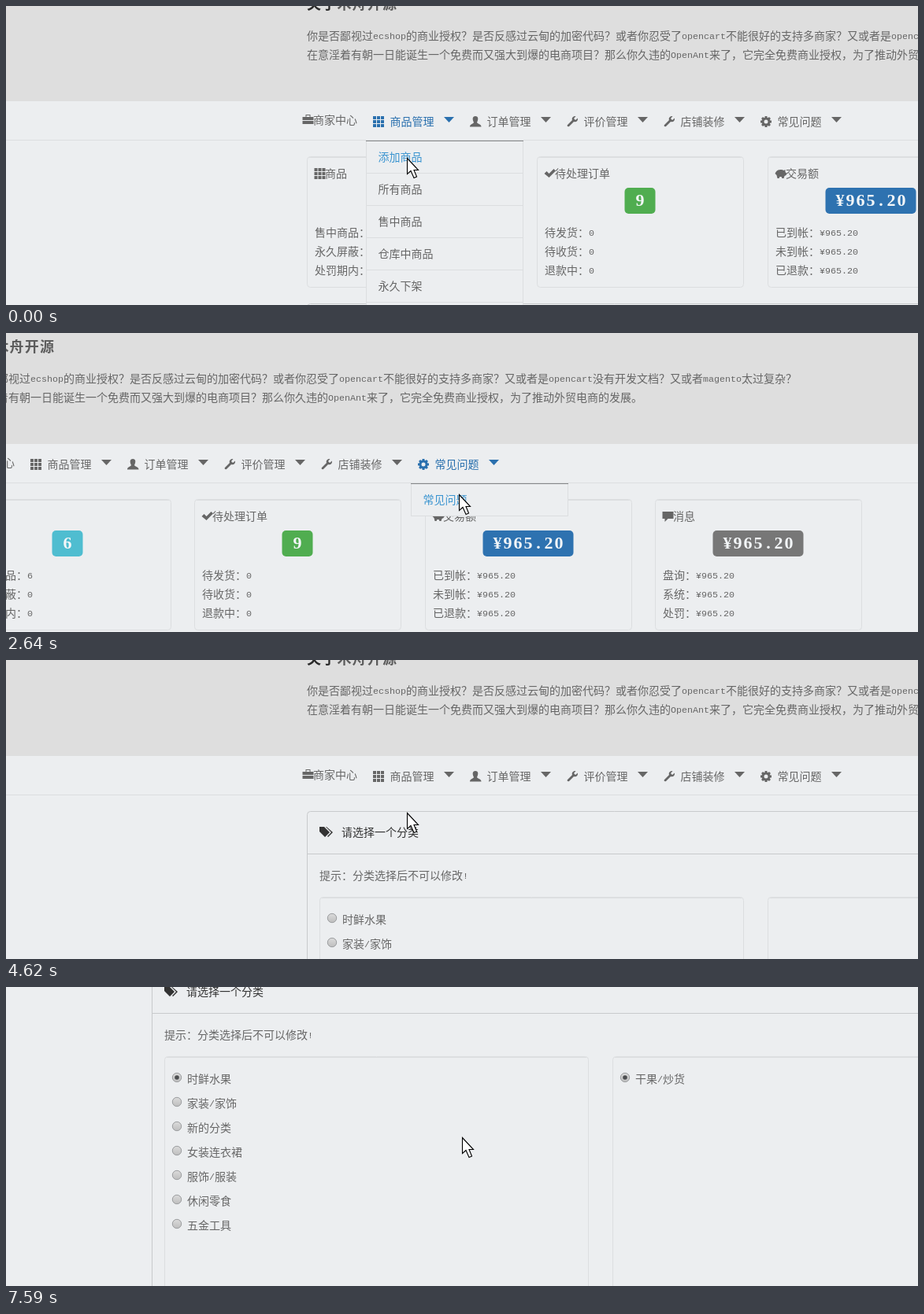
Recreate the animation shown at these times as an HTML page with a canvas. Size 1158x380 px, loop 8000 ms.

```html
<!DOCTYPE html>
<html lang="zh-CN">
<head>
<meta charset="utf-8">
<title>商家中心</title>
<style>
html, body { margin: 0; width: 100%; height: 100%; overflow: hidden; background: #eceef0; }
canvas { display: block; }
</style>
</head>
<body>
<canvas id="stage" width="1158" height="380"></canvas>
<script>
const ctx = document.getElementById('stage').getContext('2d');
const W = 1158, H = 380, LOOP = 8000, STEP = 330;
const BG = '#eceef0', INK = '#666', DARK = '#333', LINE = '#dcdee0', EDGE = '#c8cacc';
const ACTIVE = '#2a70ae', HOVER = '#3a94d0';
const SANS = '"Noto Sans CJK SC", "Noto Sans CJK", "Noto Sans SC", sans-serif';
const MONO = '"Liberation Mono", monospace';

// Camera x, y and pointer x, y on the stage, one row per step
const MOVES = [
  [0, 47, 509, 193], [40, 6, 600, 196], [75, 215, 592, 235], [80, 258, 604, 127],
  [165, 8, 585, 188], [191, 23, 598, 188], [300, 2, 590, 192], [420, 0, 585, 194],
  [435, 27, 575, 205], [0, 40, 420, 152], [0, 0, 515, 194], [0, 30, 512, 200],
  [0, 60, 510, 185], [0, 46, 509, 194], [0, 46, 509, 194], [0, 296, 475, 150],
  [0, 325, 455, 190], [0, 314, 453, 184], [0, 184, 418, 192], [0, 184, 418, 192],
  [150, 190, 560, 188], [390, 184, 590, 190], [330, 230, 585, 190], [197, 259, 579, 191]
];

// Open menu from a step on: menu index, hovered entry, caret up, opacity
const MENUS = [
  { from: 0, menu: 0, hover: 0 }, { from: 1, menu: 1, up: true }, { from: 2, menu: 1, hover: 5 },
  { from: 4, menu: 2, up: true }, { from: 6, menu: 3, up: true }, { from: 7, menu: 4, up: true },
  { from: 8, menu: 4, hover: 0 }, { from: 9 },
  { from: 10, menu: 0, up: true, alpha: 0.25, tint: '#4a6882' },
  { from: 11, menu: 0, hover: 0 }, { from: 14 }
];

const NAV = [
  { icon: 'grid', label: '商品管理', items: ['添加商品', '所有商品', '售中商品', '仓库中商品', '永久下架', '处罚期商品'] },
  { icon: 'user', label: '订单管理', items: ['所有订单', '待付款订单', '待发货订单', '待收货订单', '待评价订单', '交易成功订单', '退款中订单', '退款成功的订单'] },
  { icon: 'wrench', label: '评价管理', items: ['评价管理'] },
  { icon: 'wrench', label: '店铺装修', items: ['店铺装修'] },
  { icon: 'cog', label: '常见问题', items: ['常见问题'] }
];

const CARDS = [
  { x: 382, icon: 'grid', title: '商品', badge: '6', color: '#4fbdd0', rows: ['售中商品：6', '永久屏蔽：0', '处罚期内：0'] },
  { x: 674, icon: 'check', title: '待处理订单', badge: '9', color: '#50ad50', rows: ['待发货：0', '待收货：0', '退款中：0'] },
  { x: 967, icon: 'pig', title: '交易额', badge: '¥965.20', color: '#2e72b0', rows: ['已到帐：¥965.20', '未到帐：¥965.20', '已退款：¥965.20'] },
  { x: 1259, icon: 'comment', title: '消息', badge: '¥965.20', color: '#777', rows: ['盘询：¥965.20', '系统：¥965.20', '处罚：¥965.20'] }
];

const CATEGORIES = ['时鲜水果', '家装/家饰', '新的分类', '女装连衣裙', '服饰/服装', '休闲零食', '五金工具'];

const ICONS = {
  case: 'M0 4h14v4H0zM0 9h14v4H0zM4 4V1h6v3H9V2H5v2z',
  grid: [0, 5, 10].map(y => [0, 5, 10].map(x => `M${x} ${y}h4v4h-4z`).join('')).join(''),
  user: 'M7 0c4 0 4 4 2 8c1 2 5.500 2 5.500 5.500H0c0-3.500 4-3.500 5-5.500c-2-4-2-8 2-8z',
  wrench: 'M1 11l6-6c-1-3 1-5 4.500-5l-2.500 3 2 2 3-2.500c.5 3.500-2 5.500-5 4.500l-6 6c-2 1-3-1-2-2z',
  check: 'M0 7l3-3 3 3 6-6 2.500 2.500-8.500 8.500z',
  pig: 'M1 5c3-4 8-3 10-2l2-1v3l2 2-1 2-2 1-1 3H9l-1-2H6l-1 2H3L2 9 0 7z',
  comment: 'M0 1h14v9H7l-4 4v-4H0z',
  tags: 'M0 1h6l7 7-6 6-7-7zM8 1h1l8 7-6 6-1-1 5-5z'
};
for (const name in ICONS) ICONS[name] = new Path2D(ICONS[name]);

function rect(x, y, w, h, color) {
  ctx.fillStyle = color;
  ctx.fillRect(x, y, w, h);
}

function poly(color, ...points) {
  ctx.beginPath();
  for (let i = 0; i < points.length; i += 2) ctx.lineTo(points[i], points[i + 1]);
  ctx.closePath();
  ctx.fillStyle = color;
  ctx.fill();
}

function round(x, y, w, h, r, fill, stroke) {
  ctx.beginPath();
  ctx.roundRect(x, y, w, h, r);
  if (fill) { ctx.fillStyle = fill; ctx.fill(); }
  if (stroke) { ctx.strokeStyle = stroke; ctx.lineWidth = 1; ctx.stroke(); }
}

function oval(x, y, rx, ry, fill, angle = 0) {
  ctx.beginPath();
  ctx.ellipse(x, y, rx, ry, angle, 0, Math.PI * 2);
  ctx.fillStyle = fill;
  ctx.fill();
}

function ramp(x0, y0, x1, y1, ...colors) {
  const g = ctx.createLinearGradient(x0, y0, x1, y1);
  colors.forEach((c, i) => g.addColorStop(i / (colors.length - 1), c));
  return g;
}

// Full-width glyphs advance 14 px, half-width ones 7 px
function text(str, x, cy, color = INK) {
  ctx.fillStyle = color;
  for (const run of str.match(/[\x20-\x7e¥]+|[^\x20-\x7e¥]+/g)) {
    const half = /^[\x20-\x7e¥]/.test(run);
    ctx.font = half ? `11.67px ${MONO}` : `14px ${SANS}`;
    ctx.fillText(run, x, cy + (half ? 4 : 5));
    x += run.length * (half ? 7 : 14);
  }
}

function icon(name, x, y, color = INK) {
  ctx.save();
  ctx.translate(x, y);
  ctx.fillStyle = ctx.strokeStyle = color;
  if (name === 'cog') {
    ctx.translate(7, 7);
    ctx.lineWidth = 3;
    ctx.beginPath();
    ctx.arc(0, 0, 4, 0, Math.PI * 2);
    ctx.stroke();
    for (let i = 0; i < 8; i++) {
      ctx.rotate(Math.PI / 4);
      ctx.fillRect(-1.5, -7, 3, 3);
    }
  } else ctx.fill(ICONS[name]);
  ctx.restore();
}

function hero(sx) {
  rect(sx, -400, W, 568, '#dedede');
  ctx.font = `bold 18px ${SANS}`;
  ctx.letterSpacing = '1.2px';
  ctx.fillStyle = '#2a2a2a';
  ctx.fillText('关于', 382, 51);
  ctx.fillStyle = '#5c5c5c';
  ctx.fillText('木舟开源', 420.4, 51);
  ctx.letterSpacing = '0px';
  text('你是否鄙视过ecshop的商业授权？是否反感过云甸的加密代码？或者你忍受了opencart不能很好的支持多商家？又或者是opencart没有开发文档？又或者magento太过复杂？', 382, 85);
  text('在意淫着有朝一日能诞生一个免费而又强大到爆的电商项目？那么你久违的OpenAnt来了，它完全免费商业授权，为了推动外贸电商的发展。', 382, 109);
}

function nav(sx, open, homeColor) {
  rect(sx, 217, W, 1, LINE);
  icon('case', 376.5, 184, homeColor);
  text('商家中心', 390, 192, homeColor);
  NAV.forEach((item, i) => {
    const x = 466 + 123 * i, on = open.menu === i;
    const color = on ? open.tint || ACTIVE : INK;
    icon(item.icon, x, 187, color);
    text(item.label, x + 21.5, 194, color);
    if (on && open.up) poly(color, x + 90, 196, x + 103, 196, x + 96.5, 189);
    else poly(color, x + 90, 188, x + 103, 188, x + 96.5, 195);
  });
}

function dropdown({ menu, hover, alpha = 1 }) {
  if (menu === undefined) return;
  const x = 458 + 123 * menu, items = NAV[menu].items, h = items.length * 41;
  ctx.globalAlpha = alpha;
  rect(x - 1, 218, 200, h + 1, LINE);
  rect(x, 218, 198, h, BG);
  items.forEach((label, i) => {
    rect(x, 259 + 41 * i, 198, 1, LINE);
    text(label, x + 14.5, 239 + 41 * i, i === hover ? HOVER : INK);
  });
  rect(x - 1, 218, 200, 1, '#858789');
  ctx.globalAlpha = 1;
}

function card(c) {
  round(c.x + .5, 238.5, 262, 166, 4, BG, LINE);
  rect(c.x + 3, 239, 257, 1, LINE);
  icon(c.icon, c.x + 9.5, 253);
  text(c.title, c.x + 23, 260);
  const w = c.badge.length * 13 + (c.badge.length > 1 ? 24 : 26), left = c.x + 131 - w / 2;
  round(left, 278, w, 33, 5, c.color);
  ctx.font = 'bold 22px "Liberation Serif", serif';
  ctx.textAlign = 'center';
  ctx.fillStyle = '#f3f6f8';
  const start = left + (w - c.badge.length * 13) / 2 + 6.5;
  [...c.badge].forEach((ch, i) => ctx.fillText(ch, start + i * 13, 301));
  ctx.textAlign = 'left';
  c.rows.forEach((row, i) => text(row, c.x + 10, 335 + 24 * i));
}

function can() {
  const side = ramp(386, 0, 502, 0, '#0c3b24', '#14773d', '#2aa65a', '#15803f', '#0d4a2a');
  poly(side, 394, 255, 494, 255, 499, 272, 502, 290, 502, 460, 386, 460, 386, 290, 389, 272);
  poly(ramp(390, 0, 498, 0, '#777', '#d9dcdc', '#8b908e'), 393, 251, 495, 251, 496, 258, 392, 258);
  oval(444, 252, 51, 4, '#a4a9a8');
  oval(480, 284, 16, 25, '#cfe3ae', .5);
  oval(488, 330, 10, 30, '#8fc68a', .2);
  round(414, 296, 50, 84, 6, '#e3eee6');
}

function bud(x, y, angle, tipX) {
  ctx.save();
  ctx.translate(x, y);
  ctx.rotate(angle);
  oval(tipX, 2, 20, 19, '#e1e2e5');
  round(-27, -19, 46, 38, 8, ramp(0, -19, 0, 19, '#d9dadc', '#f4f4f5', '#a5a7aa'));
  rect(-12, -19, 4, 38, '#a9abae');
  round(14, -23, 13, 46, 6, ramp(0, -23, 0, 23, '#c2c4c6', '#ececee', '#8d9093'));
  ctx.restore();
}

function earphones() {
  rect(719, 300, 9, 160, '#dcdde0');
  rect(767, 345, 9, 120, '#dcdde0');
  rect(722, 300, 2, 160, '#c5c7ca');
  rect(770, 345, 2, 120, '#c5c7ca');
  bud(718, 289, -.12, -40);
  bud(781, 325, Math.PI - .15, -38);
  poly('#8c8f92', 669, 338, 674, 333, 679, 338, 680, 372, 668, 372);
  [346, 354, 364].forEach(y => rect(668, y, 12, 2, '#2c2e30'));
  round(666, 370, 16, 40, 2, '#4a4d50');
}

function bottle() {
  rect(1003, 256, 24, 14, '#d8c8b4');
  round(1000, 238, 29, 19, 3, ramp(1000, 0, 1029, 0, '#d8a900', '#f7d72b', '#d9ad08'));
  const cola = ramp(983, 0, 1047, 0, '#4b3026', '#1d1110', '#38201a', '#1a0f0e', '#5a3c30');
  poly('#dcdcdc', 1003, 262, 1027, 262, 1040, 280, 1046, 294, 984, 294, 990, 280);
  poly(cola, 986, 289, 1044, 289, 1047, 310, 1045, 338, 1047, 460, 983, 460, 985, 338, 983, 310);
  rect(985, 334, 60, 50, '#e6c935');
  rect(985, 349, 60, 20, '#2c5fa8');
}

function panel(headLine) {
  const top = headLine === 470 ? 425 : 238;
  round(382.5, top + .5, 1140, 620, 4, BG, EDGE);
  rect(383, headLine, 1139, 1, EDGE);
}

function homePage() {
  CARDS.forEach(card);
  panel(470);
  text('猜你喜欢', 398, 448, DARK);
  ctx.save();
  ctx.translate(80, 258);
  can();
  earphones();
  bottle();
  ctx.restore();
}

function radio(x, y, checked, hover) {
  ctx.beginPath();
  ctx.arc(x, y, 5.7, 0, Math.PI * 2);
  ctx.fillStyle = hover ? ramp(0, y - 6, 0, y + 6, '#ececec', '#d2d2d2') : ramp(0, y - 6, 0, y + 6, '#dcdcdc', '#bdbdbd');
  ctx.fill();
  ctx.strokeStyle = '#9c9ea0';
  ctx.lineWidth = 1;
  ctx.stroke();
  if (checked) oval(x, y, 2.8, 2.8, '#4c4e50');
}

function options(x, labels, checked, hover) {
  round(x + .5, 347.5, 538, 400, 4, null, LINE);
  rect(x + 3, 348, 533, 1, LINE);
  labels.forEach((label, i) => {
    radio(x + 16, 374 + 31 * i, i === checked, i === hover);
    text(label, x + 29, 375.5 + 31 * i);
  });
}

function categoryPage(step) {
  panel(292);
  icon('tags', 398, 257, DARK);
  text('请选择一个分类', 426, 265, DARK);
  text('提示：分类选择后不可以修改!', 398, 320);
  const picked = step >= 19;
  const hover = step === 17 ? 4 : step === 18 || step === 19 ? 0 : -1;
  options(398, CATEGORIES, picked ? 0 : -1, hover);
  options(967, picked ? ['干果/炒货'] : step > 14 ? CATEGORIES : [], step >= 22 ? 0 : -1, step === 21 ? 0 : -1);
}

function pointer(x, y) {
  ctx.save();
  ctx.translate(x + .5, y + .5);
  poly('#fff', 0, 0, 0, 20, 4.5, 16, 8.5, 25, 12, 23.500, 8.5, 15, 14, 15);
  ctx.strokeStyle = '#000';
  ctx.lineWidth = 1.1;
  ctx.stroke();
  ctx.restore();
}

function draw(now) {
  const step = Math.min(Math.floor(now % LOOP / STEP), MOVES.length - 1);
  const [sx, sy, px, py] = MOVES[step];
  const open = MENUS.filter(m => m.from <= step).pop();
  rect(0, 0, W, H, BG);
  ctx.save();
  ctx.translate(-sx, -sy);
  hero(sx);
  if (step < 14) homePage();
  else categoryPage(step);
  nav(sx, open, step === 9 ? HOVER : step === 10 ? '#4590bd' : INK);
  dropdown(open);
  ctx.restore();
  pointer(px, py);
}

function tick() {
  draw(performance.now());
  requestAnimationFrame(tick);
}
tick();
</script>
</body>
</html>
```
